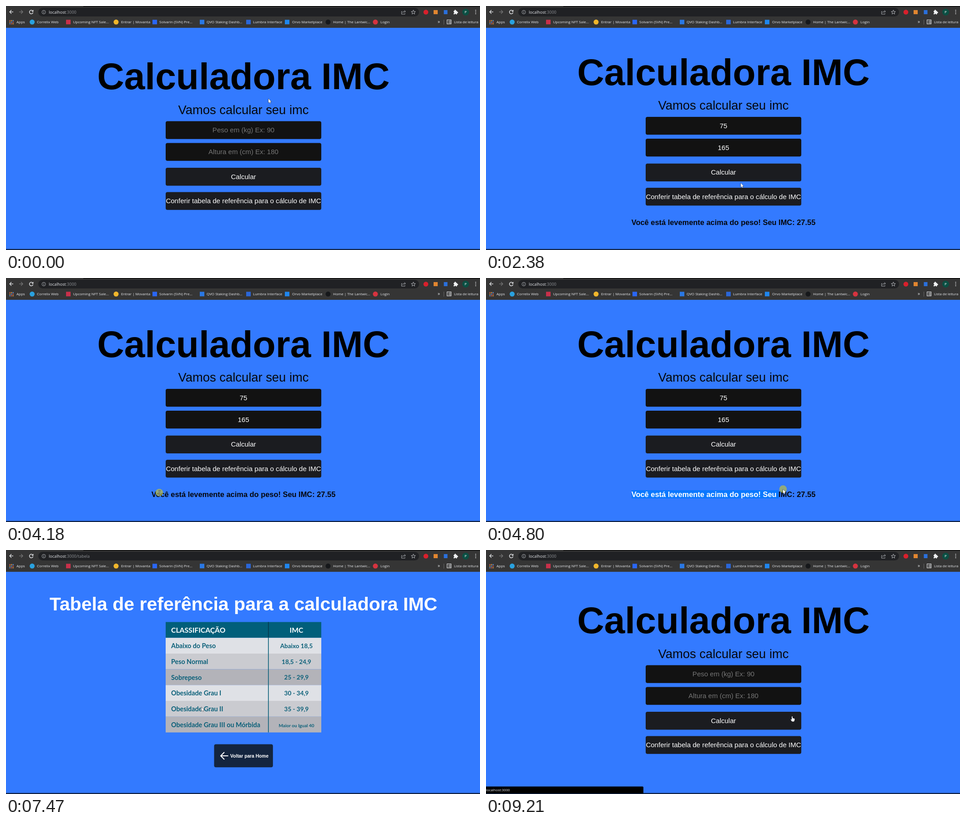
An HTML page with a canvas that plays this animation: 1042 by 537 pixels, repeating every 9.28 s.

```html
<!DOCTYPE html>
<html lang="pt-BR">
<head>
<meta charset="utf-8">
<title>Calculadora IMC</title>
<style>
html, body { margin: 0; width: 100%; height: 100%; overflow: hidden; background: #337aff; }
canvas { display: block; }
</style>
</head>
<body>
<canvas id="stage" width="1042" height="537"></canvas>
<script>
const ctx = document.getElementById('stage').getContext('2d');
const LOOP = 9280, MID = 522;
const LEFT = 351, WIDE = 342.1, TALL = 39.3, LIFT = 9.4;
const ARIAL = '"Liberation Sans", Arial, sans-serif';
const UI = '"Open Sans", "Noto Sans", sans-serif';
const TABLE = 'Lato, "Open Sans", sans-serif';
const RESULT = 'Você está levemente acima do peso! Seu IMC: 27.55';
const RESULT_FONT = 'bold 16.42px ' + ARIAL;

// Pointer path: time, x, y
const path = [
  [0, 577, 204], [70, 577, 204], [430, 554, 267], [1700, 554, 267],
  [2050, 575, 383], [2260, 575, 383], [3070, 327, 496], [3140, 326, 500],
  [3450, 342, 490], [3900, 322, 473], [4090, 322, 473], [4800, 653, 465],
  [5010, 705, 462], [5400, 724, 472], [5650, 724, 470], [5950, 708, 478],
  [6250, 708, 478], [6480, 648, 488], [6580, 648, 488], [6700, 615, 483],
  [6960, 560, 428], [7170, 560, 428], [7470, 429.5, 345.5], [7620, 429.5, 345.5],
  [7960, 600, 260], [8230, 745, 122], [8650, 557, 453], [8990, 557, 453],
  [9210, 673, 366], [LOOP, 673, 366]
];
// Times while the mouse button is held
const presses = [[440, 580], [2100, 2240], [3950, 5250], [5980, 6200],
  [6490, 6570], [7010, 7140], [8860, 8990]];

function pointer(t) {
  let i = 1;
  while (i < path.length - 1 && path[i][0] < t) i++;
  const a = path[i - 1], b = path[i];
  const k = Math.max(0, Math.min(1, (t - a[0]) / (b[0] - a[0])));
  const e = k * k * (3 - 2 * k);
  return { x: a[1] + (b[1] - a[1]) * e, y: a[2] + (b[2] - a[2]) * e };
}

function rect(x, y, w, h, color, r = 0) {
  ctx.fillStyle = color;
  ctx.beginPath();
  ctx.roundRect(x, y, w, h, r);
  ctx.fill();
}

function disc(x, y, r, color) {
  ctx.fillStyle = color;
  ctx.beginPath();
  ctx.arc(x, y, r, 0, Math.PI * 2);
  ctx.fill();
}

function text(s, x, y, font, color, align = 'left') {
  ctx.font = font;
  ctx.textAlign = align;
  ctx.fillStyle = color;
  ctx.fillText(s, x, y);
}

function poly(points, close) {
  ctx.beginPath();
  points.forEach(([x, y], i) => i ? ctx.lineTo(x, y) : ctx.moveTo(x, y));
  if (close) ctx.closePath();
}

function line(points, color, width = 1) {
  poly(points);
  ctx.strokeStyle = color;
  ctx.lineWidth = width;
  ctx.stroke();
}

function ring(x, y, r, color, width = 1, from = 0, to = Math.PI * 2) {
  ctx.beginPath();
  ctx.arc(x, y, r, from, to);
  ctx.strokeStyle = color;
  ctx.lineWidth = width;
  ctx.stroke();
}

function star(x, y, r) {
  const pts = [];
  for (let i = 0; i < 10; i++) {
    const a = -Math.PI / 2 + i * Math.PI / 5, q = i % 2 ? r * 0.42 : r;
    pts.push([x + q * Math.cos(a), y + q * Math.sin(a)]);
  }
  poly(pts, true);
  ctx.strokeStyle = '#c4c7cb';
  ctx.lineWidth = 0.9;
  ctx.stroke();
}

// Label, text x, icon centre, icon colour, round icon
const bookmarks = [
  ['Correlix Web', 68, 57.5, '#2aa1de', true],
  ['Upcoming NFT Sale...', 147.5, 137, '#c8304a', false],
  ['Entrar | Movanta', 253, 242, '#f0b62c', true],
  ['Solvarin (SVN) Pre...', 337, 327, '#2a66f5', false],
  ['QVO Staking Dashb...', 441, 431, '#2a78e4', false],
  ['Lumbra Interface', 543, 533, '#2a66d8', false],
  ['Orvo Marketplace', 629, 618, '#1f86ee', false],
  ['Home | The Lantwic...', 719, 708, '#16181b', true],
  ['Login', 823, 812, '#d5333f', true]
];

function browser(table) {
  const ink = '#e8eaed', dim = '#8e9195', small = '8px ' + UI;
  rect(0, 0, 1042, 48, '#353535');
  rect(170, 0, 872, 1.5, '#0c0c0c');
  rect(71, 4, 837, 19, '#202124', 9.5);

  line([[16, 13], [8, 13]], ink, 1.3);
  line([[12, 9], [8, 13], [12, 17]], ink, 1.3);
  line([[29, 13], [37, 13]], '#777', 1.3);
  line([[33, 9], [37, 13], [33, 17]], '#777', 1.3);
  ring(55.5, 13.3, 4, ink, 1.4, 0.2, 5.4);
  poly([[60.3, 8.3], [60.3, 12.6], [56, 12.6]], true);
  ctx.fillStyle = ink;
  ctx.fill();

  ring(83, 13.5, 4, '#b4b7bb', 0.9);
  rect(82.5, 12.8, 1, 3, '#b4b7bb');
  rect(82.5, 10.9, 1, 1, '#b4b7bb');
  const font = '9px ' + UI;
  text('localhost', 94, 16.5, font, ink);
  text(table ? ':3000/tabela' : ':3000', 94 + ctx.measureText('localhost').width, 16.5, font, dim);

  line([[871, 12], [869.5, 12], [869.5, 18], [877, 18], [877, 16]], '#b4b7bb', 0.9);
  line([[872, 15.5], [873, 12.5], [878, 12]], '#b4b7bb', 0.9);
  line([[875.5, 9.5], [878.3, 12], [875.5, 14.5]], '#b4b7bb', 0.9);
  star(895.5, 13.8, 5);

  disc(923, 13.5, 5.3, '#d9202c');
  rect(940, 9, 9, 9, '#e2862f');
  rect(962.5, 9, 8, 9, '#2a70dc');
  rect(984, 10.5, 7.5, 8, '#f1f3f4', 1);
  disc(987.5, 10, 1.7, '#f1f3f4');
  disc(992, 14.3, 1.7, '#f1f3f4');
  disc(984, 14.6, 1.3, '#353535');
  disc(987.6, 18.3, 1.3, '#353535');
  disc(1010.5, 13.5, 7.5, '#0b4f43');
  text('P', 1010.5, 16.4, small, '#fff', 'center');
  for (const y of [9.5, 13.3, 17.1]) disc(1032.5, y, 1, ink);

  const dots = ['#e35d50', '#e8a13c', '#5a9be8'];
  for (let i = 0; i < 9; i++) {
    rect(7.5 + i % 3 * 3.5, 31 + (i / 3 | 0) * 3.5, 2.2, 2.2, dots[(i + (i / 3 | 0)) % 3]);
  }
  text('Apps', 23, 38, small, ink);
  for (const [label, x, ix, color, round] of bookmarks) {
    if (round) disc(ix, 35.3, 5.5, color);
    else rect(ix - 5, 30.3, 10, 10, color);
    text(label, x, 38, small, ink);
  }
  text('»', 949, 38, '10px ' + UI, ink);
  rect(962, 30, 1, 11, '#626262');
  ctx.strokeStyle = ink;
  ctx.lineWidth = 1;
  ctx.strokeRect(969.5, 30.5, 9, 9);
  for (const y of [32.5, 34.7, 36.9]) {
    rect(971.5, y, 1, 1, ink);
    rect(973.5, y, 4, 1, ink);
  }
  text('Lista de leitura', 985, 38, '7.8px ' + UI, ink);
}

function field(y, value, hint, focus, caretOn) {
  const font = '15.05px ' + ARIAL;
  rect(LEFT, y, WIDE, TALL, '#121212', 4);
  if (focus) {
    ctx.beginPath();
    ctx.roundRect(LEFT - 0.5, y - 0.6, WIDE + 1, TALL + 1.2, 4.5);
    ctx.strokeStyle = '#fff';
    ctx.lineWidth = 1;
    ctx.stroke();
  }
  text(value || hint, MID, y + 24.7, font, value ? '#fff' : '#757575', 'center');
  if (focus && caretOn) {
    const w = value ? ctx.measureText(value).width / 2 : 0;
    rect(Math.round(MID + w), y + 12, 1, 17, '#fff');
  }
}

function button(y, label) {
  rect(LEFT, y, WIDE, TALL, '#1b1c20', 4);
  text(label, MID, y + 24.7, '15.05px ' + ARIAL, '#fff', 'center');
}

function typed(s, t, start, gap) {
  return s.slice(0, Math.max(0, Math.floor((t - start) / gap) + 1));
}

// Selected span of the result line as character indexes
function selection(t, x) {
  const all = RESULT.length;
  if (t >= 4110 && t < 6050) {
    if (t > 5150) return [0, all];
    ctx.font = RESULT_FONT;
    const left = MID - ctx.measureText(RESULT).width / 2;
    let n = 0;
    while (n < all && left + ctx.measureText(RESULT.slice(0, n + 1)).width < x - 9) n++;
    return [0, n];
  }
  return t >= 6050 && t < 6500 ? [all - 5, all] : null;
}

function result(sel) {
  const base = 481.6;
  text(RESULT, MID, base, RESULT_FONT, '#05070c', 'center');
  if (!sel || sel[0] === sel[1]) return;
  const left = MID - ctx.measureText(RESULT).width / 2;
  const [a, b] = sel.map(n => left + ctx.measureText(RESULT.slice(0, n)).width);
  ctx.save();
  ctx.beginPath();
  ctx.rect(a, 467, b - a, 18.5);
  ctx.clip();
  rect(a, 467, b - a, 18.5, '#0a78ff');
  text(RESULT, MID, base, RESULT_FONT, '#fff', 'center');
  ctx.restore();
}

const solved = t => t >= 2200 && t < 7150;

function home(t, p) {
  const done = solved(t), filled = t < 7150;
  const up = done ? LIFT : 0;
  const first = t >= 480 && t < 1030, second = t >= 1030 && t < 2200;
  text('Calculadora IMC', MID, 183 - up, 'bold 82.1px ' + ARIAL, '#000', 'center');
  text('Vamos calcular seu imc', MID, 237.5 - up, '27.37px ' + ARIAL, '#05070c', 'center');
  field(253.4 - up, filled ? typed('75', t, 760, 130) : '', 'Peso em (kg) Ex: 90', first, true);
  field(301.4 - up, filled ? typed('165', t, 1310, 130) : '', 'Altura em (cm) Ex: 180', second,
    t < 1960);
  button(356.1 - up, 'Calcular');
  button(409.4 - up, 'Conferir tabela de referência para o cálculo de IMC');
  if (done) result(selection(t, p.x));
}

const rows = [
  ['Abaixo do Peso', 'Abaixo 18,5'], ['Peso Normal', '18,5 - 24,9'],
  ['Sobrepeso', '25 - 29,9'], ['Obesidade Grau I', '30 - 34,9'],
  ['Obesidade Grau II', '35 - 39,9'],
  ['Obesidade Grau III ou Mórbida', 'Maior ou Igual 40']
];

function reference() {
  const teal = '#0b6079', shades = ['#dfe1e6', '#cacbd0', '#b3b3b9'];
  const top = 158.5, step = 34.7;
  text('Tabela de referência para a calculadora IMC', MID, 133, 'bold 41.05px ' + ARIAL, '#fff', 'center');
  rect(LEFT, top, WIDE, step, '#015f7a');
  text('CLASSIFICAÇÃO', 363, 182, 'bold 15.7px ' + TABLE, '#fff');
  text('IMC', 638.5, 182, 'bold 15.7px ' + TABLE, '#fff', 'center');
  rows.forEach(([name, range], i) => {
    const y = top + (i + 1) * step;
    rect(LEFT, y, WIDE, step, shades[i % 3]);
    text(name, 363, y + 23, 'bold 14.3px ' + TABLE, teal);
    text(range, 638.5, y + 22.8, `bold ${i === 5 ? 10 : 13.5}px ` + TABLE, teal, 'center');
  });
  rect(576, top, 1.6, step, '#06384c');
  rect(576, top + step, 1.6, step * 6, teal);

  rect(457.5, 427.6, 129.3, 50.6, '#14253f', 4);
  line([[488.5, 453], [472, 453]], '#fff', 2);
  line([[480, 445], [472, 453], [480, 461]], '#fff', 2);
  text('Voltar para Home', 493, 456.5, 'bold 10.26px ' + ARIAL, '#fff');
}

function cursorKind(t, p, table) {
  const inside = (x, y, w, h) => p.x >= x && p.x < x + w && p.y >= y && p.y < y + h;
  if (table) return inside(457, 428, 130, 51) ? 'hand' : 'arrow';
  const done = solved(t), up = done ? LIFT : 0;
  const over = y => inside(LEFT, y - up, WIDE, 40);
  if (over(253) || over(301)) return 'beam';
  if (over(356) || over(409)) return 'hand';
  return done && inside(319, 467, 407, 19) ? 'beam' : 'arrow';
}

const shapes = {
  arrow: [[0, 0], [0, 9], [2, 7.2], [3.4, 10.2], [4.8, 9.6], [3.5, 6.7], [6.2, 6.5]],
  hand: [[-0.8, 0.6], [0, 0], [0.9, 0.6], [1, 4], [5, 5], [5.6, 6], [5.2, 9], [4, 11.5],
    [-0.3, 11.5], [-3.2, 7.4], [-2.8, 6.5], [-0.8, 7.6]]
};

function drawCursor(kind, x, y) {
  ctx.save();
  ctx.translate(x, y);
  if (kind === 'beam') {
    for (const [color, w] of [['#111', 1.8], ['#bbb', 1]]) {
      line([[0.5, 0.5], [0.5, 9.5]], color, w);
      line([[-1.5, 0.5], [2.5, 0.5]], color, w);
      line([[-1.5, 9.5], [2.5, 9.5]], color, w);
    }
  } else {
    poly(shapes[kind], true);
    ctx.lineJoin = 'round';
    ctx.lineWidth = 1;
    ctx.strokeStyle = '#10131a';
    ctx.stroke();
    ctx.fillStyle = '#fff';
    ctx.fill();
  }
  ctx.restore();
}

function draw(t) {
  const table = t >= 7150 && t < 9050;
  const p = pointer(t);
  rect(0, 0, 1042, 537, '#337aff');
  browser(table);
  if (table) reference();
  else home(t, p);
  rect(0, 534, 1042, 1, '#2a63cc');
  rect(0, 535, 1042, 2, '#10213f');
  if (t >= 8600) {
    rect(0, 520.5, 346, 15, '#000', [0, 2, 0, 0]);
    text('localhost:3000', 0, 531, '7.8px ' + UI, '#e8eaed');
  }
  const kind = cursorKind(t, p, table);
  if (presses.some(([a, b]) => t >= a && t < b)) disc(p.x, p.y - 0.4, 8.3, 'rgba(185,190,70,.7)');
  drawCursor(kind, p.x, kind === 'beam' && t > 3000 ? p.y - 5 : p.y);
}

const begin = performance.now();
function tick(now) {
  draw(Math.max(0, now - begin) % LOOP);
  requestAnimationFrame(tick);
}
draw(0);
requestAnimationFrame(tick);
</script>
</body>
</html>
```
